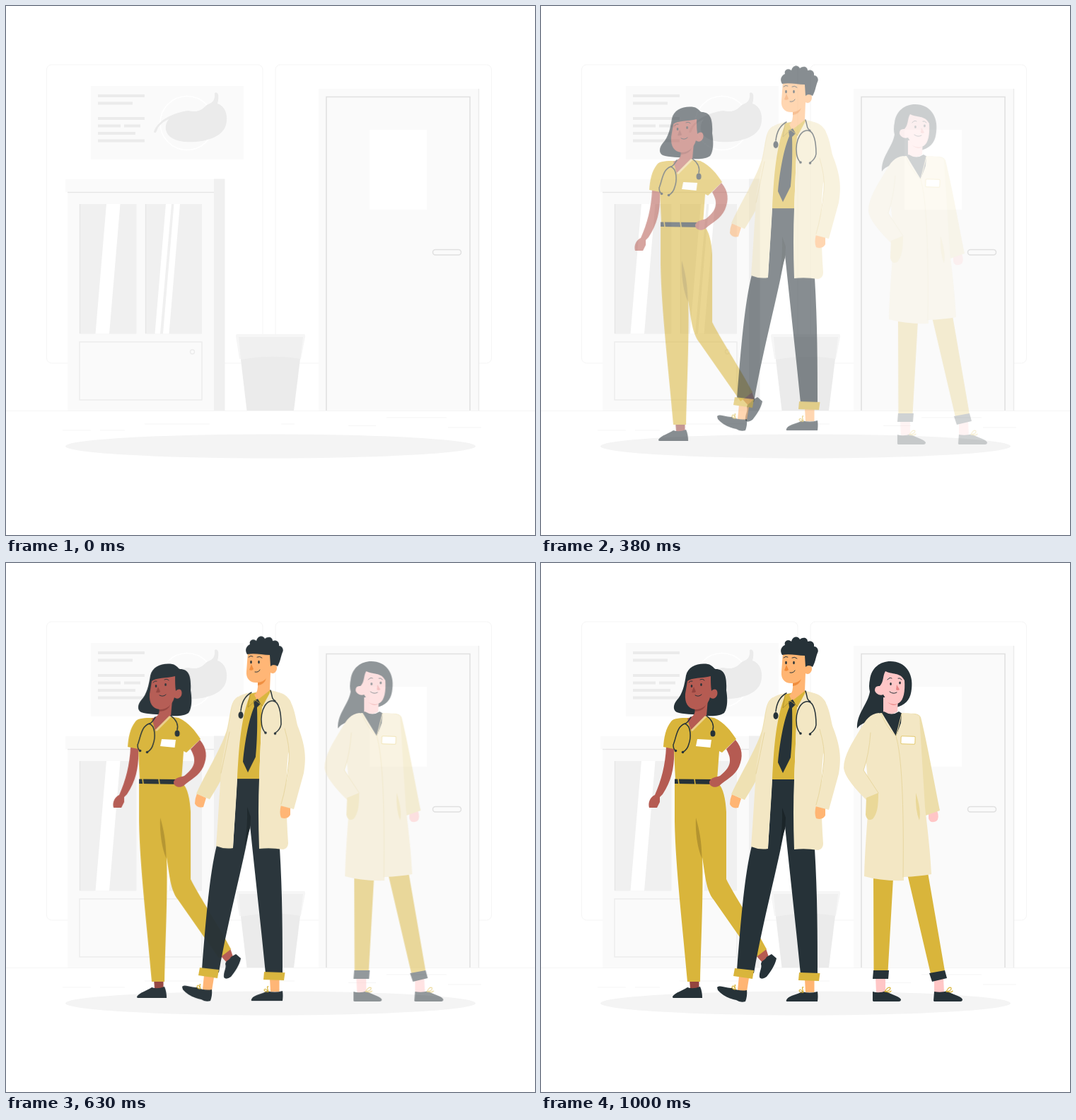
These frames come from a looping animation (748x748 px, 1.04 s). An HTML page:

```html
<!DOCTYPE html>
<html lang="en">
<head>
<meta charset="utf-8">
<title>Clinic team</title>
<style>
html, body { margin: 0; width: 100%; height: 100%; overflow: hidden; background: #fff; }
svg { display: block; width: 100vw; height: 100vh; }
.dark { fill: #263238; }
.yellow { fill: #d9b53b; }
.coat { fill: #f3e7c4; }
.sleeve { fill: #efe1b3; }
.shade { fill: #ead898; }
.fold { fill: #b4942f; }
.brown { fill: #b55b52; }
.brown2 { fill: #94443f; }
.tan { fill: #ffb573; }
.tan2 { fill: #f08c3c; }
.pink { fill: #ffc6c6; }
.pink2 { fill: #e88787; }
.white { fill: #fff; }
.g1 { fill: #fafafa; }
.g2 { fill: #f0f0f0; }
.g3 { fill: #ebebeb; }
.line { fill: none; stroke: #263238; stroke-width: 1.5; stroke-linecap: round; stroke-linejoin: round; }
.thin { stroke-width: 1; }
.lace { stroke: #d9b53b; stroke-width: 1.2; }
.seam { stroke: #e8d7a0; stroke-width: 1; }
.wall { fill: none; stroke: #f5f5f5; }
.edge { fill: none; stroke: #e0e0e0; stroke-width: 1.5; }
</style>
</head>
<body>
<svg viewBox="0 0 748 748">
  <!-- room -->
  <g>
    <rect class="wall" x="57.5" y="83" width="305.5" height="422" rx="7"/>
    <rect class="wall" x="381" y="83" width="305.5" height="422" rx="7"/>
    <path class="wall" stroke-width="1.2" d="M0 572.5H748M80 600h40M133 600h35M196 591h92M389 591h19M484 593.5h39M538 582h85M625 596h47"/>
    <ellipse cx="374" cy="622.5" rx="290" ry="17" fill="#f4f4f4"/>

    <path class="g1" d="M120 113H336V217H120Z"/>
    <path fill="none" stroke="#ebebeb" stroke-width="4.2" d="M130 127h66M130 137.500h49M130 159h66M130 169.500h32M167 169.500h23M130 180h53M130 190.500h66"/>
    <circle cx="256" cy="165.5" r="38" fill="none" stroke="#fff" stroke-width="1.5"/>
    <path class="g3" d="M209 178C215 160 240 150 258 148C268 150 274 150 284 140C291 137 296 135 295 123Q298 121 300 125Q301 132 299 138C309 141 313 152 312 162C311 179 297 187 277 191C250 195 229 190 226 175C225 168 228 163 230 160C222 164 216 168 213 177Q211 181 209 178Z"/>

    <path class="g1" d="M84 245H294V572H87V263H84Z"/>
    <path class="g2" d="M294 244.500H309.500V572H294ZM104 280H184.500V463.500H104ZM197 280H277V463.500H197Z"/>
    <path class="white" d="M142 280H161.500L146 463.500H126.500ZM226 280H234L218 463.500H210.500ZM237.500 280H246L230.500 463.500H222Z"/>
    <path fill="none" stroke="#e6e6e6" stroke-width="1.4" d="M87 263.500H294M104.500 280V463M197.500 280V463"/>
    <rect x="104" y="475" width="173" height="82" fill="none" stroke="#ebebeb" stroke-width="1.3"/>
    <circle cx="263.5" cy="489" r="3" fill="none" stroke="#ebebeb" stroke-width="1.3"/>

    <path fill="#f6f6f6" d="M327 464H421Q424 464 423 468L417 499H330L325 467Q325 464 327 464Z"/>
    <path class="g2" d="M329 468H420L416 500H332Z"/>
    <path class="g3" d="M332 500Q377 492 416 499L407 572H340.500Z"/>

    <path class="g1" d="M442 117H669V572H442Z"/>
    <path fill="none" stroke="#ebebeb" stroke-width="1.3" d="M668.500 117V572"/>
    <path class="edge" d="M453 572V128.500H656V572"/>
    <path class="white" d="M514 175H595V288H514Z"/>
    <rect class="edge" x="603.5" y="344.5" width="40" height="7.5" rx="3.7"/>
  </g>

  <!-- nurse -->
  <g id="nurse">
    <path class="brown" d="M177 260L188 262C189 285 186 306 172 327L168 331V338L164 346L153 346C151 340 154 331 161 328C170 308 176 285 177 260Z"/>
    <path class="brown2" d="M210 589H223.500V602H211Z"/>
    <path class="brown" d="M304 555L318 545L322 557L313 565Z"/>
    <path class="dark" d="M311 567C312 561 316 563 319 557L326 553L333 559C331 569 324 579 319 585Q312 590 309 586C308 578 313 573 311 567ZM186 613C190 607 200 605 207 600Q215 603 225 599Q228 606 228 615H187Q186 615 186 613Z"/>
    <path class="yellow" d="M189 311H250C258 318 261 334 262 352V447C272 468 300 510 319 546L302 559L244 476C233 462 232 440 228 416C230 460 226 540 225 592H207C201 520 190 430 189 365Z"/>
    <path class="fold" d="M219 360C224 378 227 392 227.500 418C221 402 218 381 219 360Z"/>
    <path class="yellow" d="M207 219C198 219 188 219 184 224C176 234 174 247 173 260L188 263L190 307H249L252 266L256 268L276 249C268 237 260 226 245 219L232 217Z"/>
    <path class="dark" d="M189 305.500L250 306V313L189 312Z"/>
    <path fill="none" stroke="#d9b53b" stroke-width="1.6" d="M194 305l1 8M217 305l1 8"/>
    <path class="dark" d="M205 159C208 146 222 141 236 143C242 144 244 149 247 150C260 150 263 161 262 180C264 192 264 205 259 212C252 217 238 217 228 215C216 214 200 214 192 211C186 208 187 200 192 194C200 186 203 172 205 159Z"/>
    <path class="brown" d="M217 203L236 193L234 216L212 237L207 220C217 217 219 212 217 203Z"/>
    <path class="brown2" d="M218 207Q229 206 234 199Q230 210 218 210Z"/>
    <path class="brown" d="M207 167C212 162 228 163 240 160C240 168 240 174 241 181C247 175 251 181 249 187C247 192 242 193 239 190C236 201 228 207 218 207C208 206 203 198 204 185Z"/>
    <path class="brown2" d="M216 175L213 183Q217 184 219 182Z"/>
    <path class="line thin" d="M209 169q2-3 5-2M225 165q4-2 6 1M218 187q5 3 9-1"/>
    <ellipse class="dark" cx="213" cy="174" rx="1.300" ry="2"/>
    <ellipse class="dark" cx="226.500" cy="172" rx="1.300" ry="2"/>
    <path fill="none" stroke="#ecd08c" stroke-width="3" d="M233 217L213 237"/>
    <path class="line" d="M212 218C209 222 208 226 204 227C192 230 191 248 187 257Q187 263 190 265M203 227C213 230 212 248 209 256Q207 264 201 267M234 216C242 222 245 228 243 236"/>
    <circle class="dark" cx="190.5" cy="265.5" r="1.8"/>
    <circle class="dark" cx="200.5" cy="267.5" r="1.8"/>
    <ellipse class="dark" cx="243" cy="241" rx="3.5" ry="4.5"/>
    <path class="white" d="M221 249L241 250L239.500 261L219 259Z"/>
    <path class="brown" d="M275 250C285 262 286 274 280 288C274 301 262 306 252 315C246 319 237 316 238 309C241 303 247 303 253 301C262 294 268 286 267 278C267 272 264 268 262 263Z"/>
  </g>

  <!-- tall doctor -->
  <g id="tall">
    <path class="tan" d="M270 327L283 333L279 346Q270 348 267 341Q267 334 270 327ZM280 584L294 587L291 606L278 604ZM373 588H386.500V607H374Z"/>
    <path class="dark" d="M249 600C254 596 262 602 270 601Q281 606 291 604Q292 612 289 620Q282 622 276 618C265 616 256 611 250 604ZM347 618C350 611 362 611 369 606Q380 609 391 606Q392 612 391 620H348Q346 620 347 618Z"/>
    <path class="line lace" d="M275 603q-3-8-5-3q1 3 5 3q-2-8 0-6M371 607q-5-6-6-2q2 3 6 2q-3-9 0-7"/>
    <path class="dark" d="M327 303H358V402L387 404C391 470 391 530 391 581H367C360 510 352 440 345 372C335 430 315 500 301 580L277 576C283 500 288 440 298 400L321 402Z"/>
    <path fill="#1b2529" d="M341 346L346 360L345 376L337 402Q342 375 341 346Z"/>
    <path class="yellow" d="M274 573L301 576L299 588L272 584ZM365 579L394.500 580L393 591L364 590ZM343 186L373 180L380 190L362 205L358 306H326L331 220Z"/>
    <path class="tan" d="M342 127L374 128V146C383 140 386 151 380 156Q377 158 374 156L373 181L355 195L351 187Q357 184 356 170C345 171 339 164 340 154Z"/>
    <path class="tan2" d="M356 170Q364 169 368 164Q365 173 356 174ZM347 144L344 152Q348 154 350 151Z"/>
    <path class="dark" d="M341 130C337 124 340 118 345 116C343 110 350 107 354 111C356 103 364 103 366 108C371 104 377 106 377 111C383 109 387 113 386 118C391 118 393 124 391 127C388 135 388 140 384 147Q378 143 374 147L373 131C362 131 352 128 341 130Z"/>
    <path class="line thin" d="M343 134q3-3 6-1M355 134q4-2 7 1M352 155q5 1 7-3"/>
    <ellipse class="dark" cx="346.5" cy="141" rx="1.3" ry="2.2"/>
    <ellipse class="dark" cx="357.5" cy="141" rx="1.3" ry="2.2"/>
    <path class="dark" d="M350 196L356 193L360 200L355 205C356 240 354 265 353 275L342 297L335 282C338 250 344 220 351 204Z"/>
    <path class="line thin" style="stroke:#b4942f" d="M345 187L342 205L353 195L367 206L374 187"/>
    <path class="sleeve" d="M328 190C317 196 318 212 313 234C307 258 284 295 269 327L288 335C300 316 308 302 314 285Z"/>
    <path class="coat" d="M345 184C330 187 322 192 320 202L305 285C302 320 300 365 297 401Q309 406 321 404C323 370 326 330 327 305C329 270 331 225 344 190ZM375 181C390 184 400 190 403 198L399 270C395 310 396 350 399 397Q399 404 392 406Q374 403 358 405Q356 350 358 306L362 205Z"/>
    <path class="tan" d="M389 343L402 346V357Q398 364 389 361Q386 354 389 343Z"/>
    <path class="coat" d="M386 184C403 188 407 205 412 230C423 258 425 275 421 298L407 349L388 344C396 318 400 300 400 272L390 230Z"/>
    <path class="line seam" d="M394 235Q402 262 400 280Q397 315 389 342M316 240Q310 270 304 298"/>
    <path class="line" d="M347 184C336 190 333 200 332 210M374 181C377 189 375 193 381 196M366 240C357 230 360 199 375 196C387 194 389 215 389 229Q388 236 381 241"/>
    <ellipse class="dark" cx="332" cy="216" rx="3.5" ry="5"/>
    <circle class="dark" cx="367" cy="241" r="1.8"/>
    <circle class="dark" cx="380.5" cy="242" r="1.8"/>
  </g>

  <!-- second doctor -->
  <g id="second">
    <path class="pink" d="M473 585H487V608H474ZM556 588L569 586L570 608H556ZM548 353L560 350Q564 361 559 365Q550 369 548 361Z"/>
    <path class="dark" d="M469 619V606Q478 609 488 605C494 611 505 611 509 617Q509 620 506 620H470ZM555 619L556 606Q566 608 575 605C581 611 593 611 596 617Q596 620 593 620H556Z"/>
    <path class="line lace" d="M486 606q5-8 8-5q0 4-8 5q8 2 9-1M573 606q4-8 7-5q1 4-7 5q8 2 9-1"/>
    <path class="yellow" d="M470 445H498L490.500 578H470.500ZM518 440L547 438L571 577L551 581Z"/>
    <path class="dark" d="M470 576H492L491 588H469ZM549 580L571 576L574 587L553 592Z"/>
    <path class="dark" d="M465 165C467 148 480 139 494 139C515 139 527 156 524 178C523 190 518 199 506 203L485 210C478 217 468 221 460 225Q451 228 447 234C446 213 462 200 465 182Q463 174 465 165Z"/>
    <path class="pink" d="M484 190H505L504 210Q496 216 484 212Z"/>
    <path class="pink2" d="M490 197Q497 201 504 199Q499 204 490 197Z"/>
    <path class="pink" d="M479 174C485 168 483 159 487 153C496 158 508 154 514 166C515 181 513 194 506 198C498 201 489 196 484 186C479 188 473 185 472 180Q472 173 479 174Z"/>
    <path class="pink2" d="M503 172L507 179Q504 181 502 179Z"/>
    <path class="line thin" d="M490 165q3-4 6-2M505 163q3-1 5 2M493 182q5 4 10 1"/>
    <ellipse class="dark" cx="494.5" cy="171" rx="1.3" ry="2.1"/>
    <ellipse class="dark" cx="507.5" cy="169.5" rx="1.3" ry="2.1"/>
    <path class="dark" d="M480 213L485 210Q496 217 506 210L511 213L509 230L502 245Z"/>
    <path class="shade" style="fill:#eddeab" d="M522 213Q534 212 537 218C545 250 556 310 564 350L544 357L534 320Z"/>
    <path class="coat" d="M482 212C466 213 459 224 457 250L464 330C461 370 458 405 457 443Q482 450 513 449V444Q535 443 552 440C550 400 545 365 543 345L535 217Q530 212 510 212L509 226L502 245Z"/>
    <path class="coat" d="M478 212C465 213 459 222 452 234C440 254 428 272 428 290C430 305 450 325 463 338L477 325L456 293L467 262Z"/>
    <path class="shade" d="M460 332L477 325C477 342 476 354 469 362Q461 366 459 356ZM530 325Q529 350 535 364Q538 350 530 325Z"/>
    <path class="line seam" d="M481 213Q488 232 502 245L510 213M502 245Q514 285 512 444M466 240Q464 270 456 293L477 325"/>
    <rect x="509" y="245" width="20" height="11" rx="1.5" transform="rotate(2 519 250)" fill="#fff" stroke="#e3c96e"/>
  </g>
</svg>
<script>
const bounce = 'cubic-bezier(.36, -.01, .5, 1.38)';

function enter(id, from, easing) {
  const anim = document.getElementById(id).animate(
    { transform: [`translate(${from})`, 'translate(0, 0)'], opacity: [0, 1] },
    { duration: 1000, fill: 'both', easing });
  anim.pause();
  return anim;
}

const anims = [
  enter('nurse', '-44.9px, 0px', bounce),
  enter('tall', '0px, -44.9px', bounce),
  enter('second', '44.9px, 0px', 'ease-in')
];

const LOOP = 1040, STEP = 1000 / 24, LEAD = 34;
const start = performance.now();

function draw() {
  const t = (performance.now() - start) % LOOP;
  const step = Math.floor((t + 5) / STEP);
  // the first two steps show the empty room
  const at = step < 2 ? 0 : Math.min(1000, step * STEP + LEAD);
  for (const anim of anims) anim.currentTime = at;
  requestAnimationFrame(draw);
}
draw();
</script>
</body>
</html>
```
